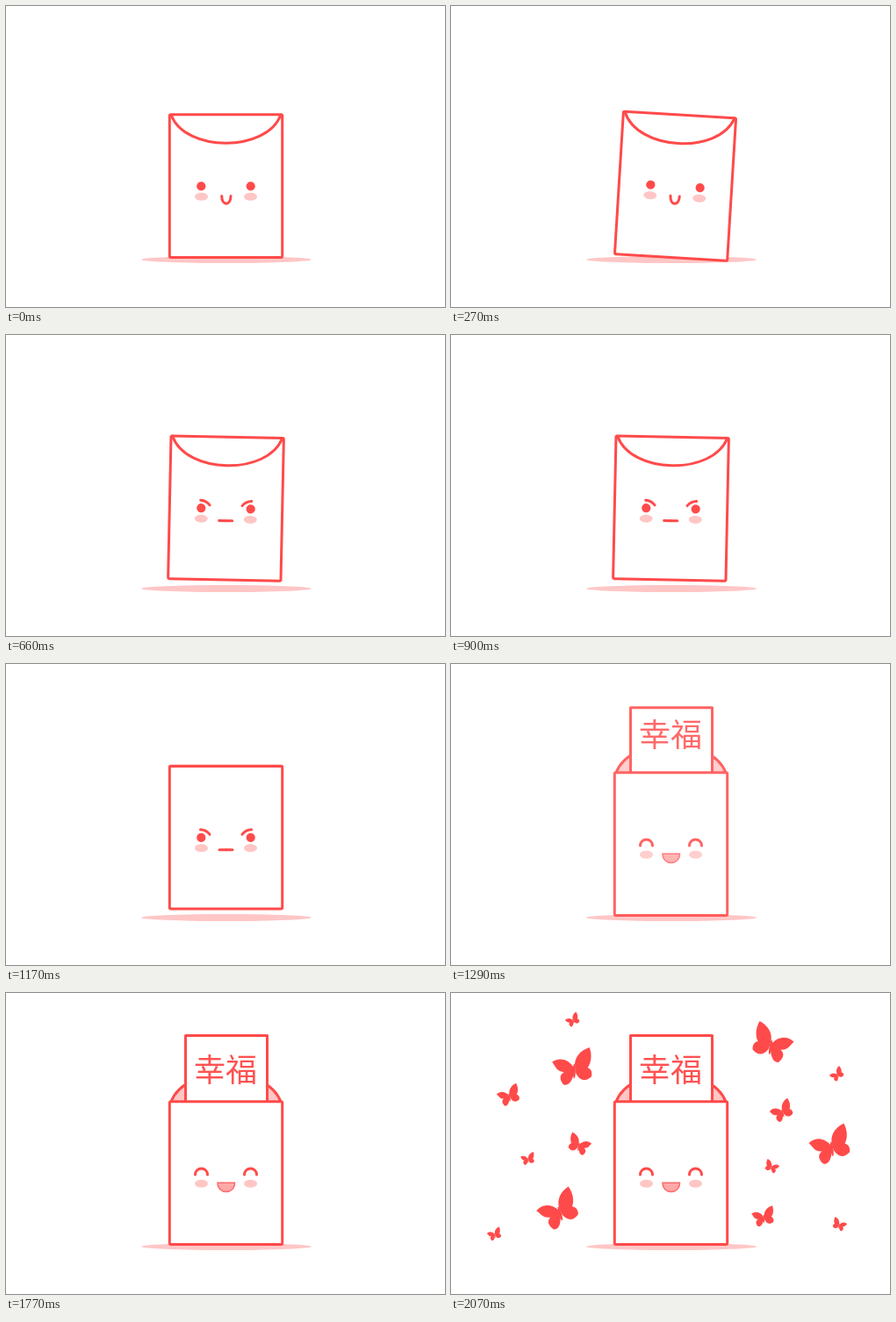
Write an HTML page that moves like this. It is 500x343 px and loops after 4.07 s.

```html
<!DOCTYPE html>
<html lang="zh">
<head>
<meta charset="utf-8">
<title>Happy envelope</title>
<style>
  html, body { margin: 0; width: 100%; height: 100%; overflow: hidden; background: #fff; }
  svg { display: block; width: 100%; height: 100%; }
  .line { fill: none; stroke: #ff4a4a; stroke-width: 3; stroke-linecap: round; stroke-linejoin: round; }
  .paper { fill: #fff; }
  .pink { fill: #ffc6c6; }
  .red { fill: #ff4a4a; }
  .mouth { fill: #ffa8a8; stroke: #ff6a6a; stroke-width: 1.5; }
  text { font: 36px "Noto Sans CJK SC", "Noto Sans CJK", sans-serif; text-anchor: middle; fill: #ff5252; }
</style>
</head>
<body>
<svg viewBox="0 0 500 343">
  <defs>
    <g id="fly" class="red">
      <path d="M1 -1C-4 -9 -14 -12 -22 -6C-18 -2 -18 4 -9 5C-16 9 -12 16 -9 19C-3 20 0 14 2 6Z"/>
      <path d="M3 -1C2 -11 9 -19 19 -22C22 -14 21 -5 17 0C22 2 22 7 21 10C14 16 8 14 4 6Z"/>
      <ellipse cx="2.2" cy="4" rx="1.5" ry="8"/>
    </g>
  </defs>
  <ellipse class="pink" cx="251" cy="289" rx="97" ry="4"/>
  <g id="body">
    <path id="openFlap" class="line" style="fill:#ffc6c6"/>
    <g id="letter">
      <rect class="line paper" x="204.5" y="48.5" width="93" height="100"/>
      <text id="word" x="250"/>
    </g>
    <rect class="line paper" x="186.3" y="123.7" width="128.4" height="162.8" rx="1.5"/>
    <path id="shutFlap" class="line"/>
    <g id="half">
      <ellipse class="pink" cx="222.5" cy="217.3" rx="7.5" ry="4.5"/>
      <circle class="red calm angry" cx="222.3" cy="205.3" r="5.1"/>
      <path class="line angry" d="M243 219.2H250.5M221.5 196.3Q228 196.5 232 201.7"/>
      <path class="line happy" d="M215.5 207A7 7 0 0 1 229.5 207"/>
    </g>
    <use href="#half" transform="translate(501 0) scale(-1 1)"/>
    <path class="line calm" d="M245.7 216.5C245.7 228 256 228 256 216.5"/>
    <path class="mouth happy" d="M241 216.3H260.5C260.5 230 241 230 241 216.3Z"/>
  </g>
  <g id="flies"></g>
</svg>
<script>
const LOOP = 4070;
const $ = id => document.getElementById(id);
const put = (id, name, value) => $(id).setAttribute(name, value);
const show = (el, on) => el.setAttribute('visibility', on ? 'visible' : 'hidden');
const ramp = (t, a, b) => Math.min(1, Math.max(0, (t - a) / (b - a)));
const hump = (t, a, b) => Math.sin(Math.PI * ramp(t, a, b));
const faces = document.querySelectorAll('.calm, .angry, .happy');

// each swarm tilts further one by one, its last quarter faces the other way
function swarm(size, spots) {
  return spots.map(([x, y], i) => {
    const flip = i >= Math.floor(spots.length * 0.75);
    const tilt = flip ? 10 : -8 * i;
    return `<use href="#fly" transform="translate(${x} ${y}) rotate(${tilt}) scale(${flip ? -size : size} ${size})"/>`;
  }).join('');
}
$('flies').innerHTML =
  swarm(1.04, [[138, 85], [431, 174], [121, 248], [367, 58]]) +
  swarm(0.58, [[355, 255], [65, 117], [376, 135], [147, 173]]) +
  swarm(0.36, [[87, 189], [49, 275], [138, 31], [439, 93], [366, 198], [443, 264]]);
$('word').textContent = '幸福';

function draw(time) {
  const t = Math.floor(time / 30) * 30;
  const settled = time >= 1770;

  // lean over, hop up trembling, land again
  const lean = 3.6 * hump(t, 150, 360);
  const lift = -7.5 * (ramp(t, 270, 390) - ramp(t, 1170, 1260));
  const power = ramp(t, 300, 390) * (1 - ramp(t, 1050, 1170));
  const shake = 2.08 * power * Math.sin(2 * Math.PI * (t - 450) / 120 + 4.1);
  put('body', 'transform',
    `translate(0 ${lift}) rotate(${shake} 250.5 205) rotate(${lean} 250.5 287)`);
  put('body', 'opacity', t >= 1260 && !settled ? 0.86 : 1);

  const fold = 1 - 2 * ramp(t, 1080, 1260);
  const edge = 124 + 43 * fold;
  const flap = `M188 124C204 ${edge} 297 ${edge} 313 124`;
  put('openFlap', 'd', flap);
  put('shutFlap', 'd', flap);
  show($('openFlap'), fold < 0);
  show($('shutFlap'), fold >= 0);

  const rise = 1 - (1 - ramp(t, 1170, 1320)) ** 2.6;
  put('letter', 'transform', `translate(0 ${76 * (1 - rise) - 2 * hump(t, 1290, 1440)})`);
  show($('letter'), t > 1170);
  put('word', 'y', settled ? 101 : 93);

  const mood = t < 300 ? 'calm' : t < 1200 ? 'angry' : 'happy';
  faces.forEach(el => show(el, el.classList.contains(mood)));

  put('flies', 'opacity', ramp(Math.floor((time - 1770) / 100), 0, 3));
}

const start = performance.now();
function tick() {
  draw((performance.now() - start) % LOOP);
  requestAnimationFrame(tick);
}
tick();
</script>
</body>
</html>
```
